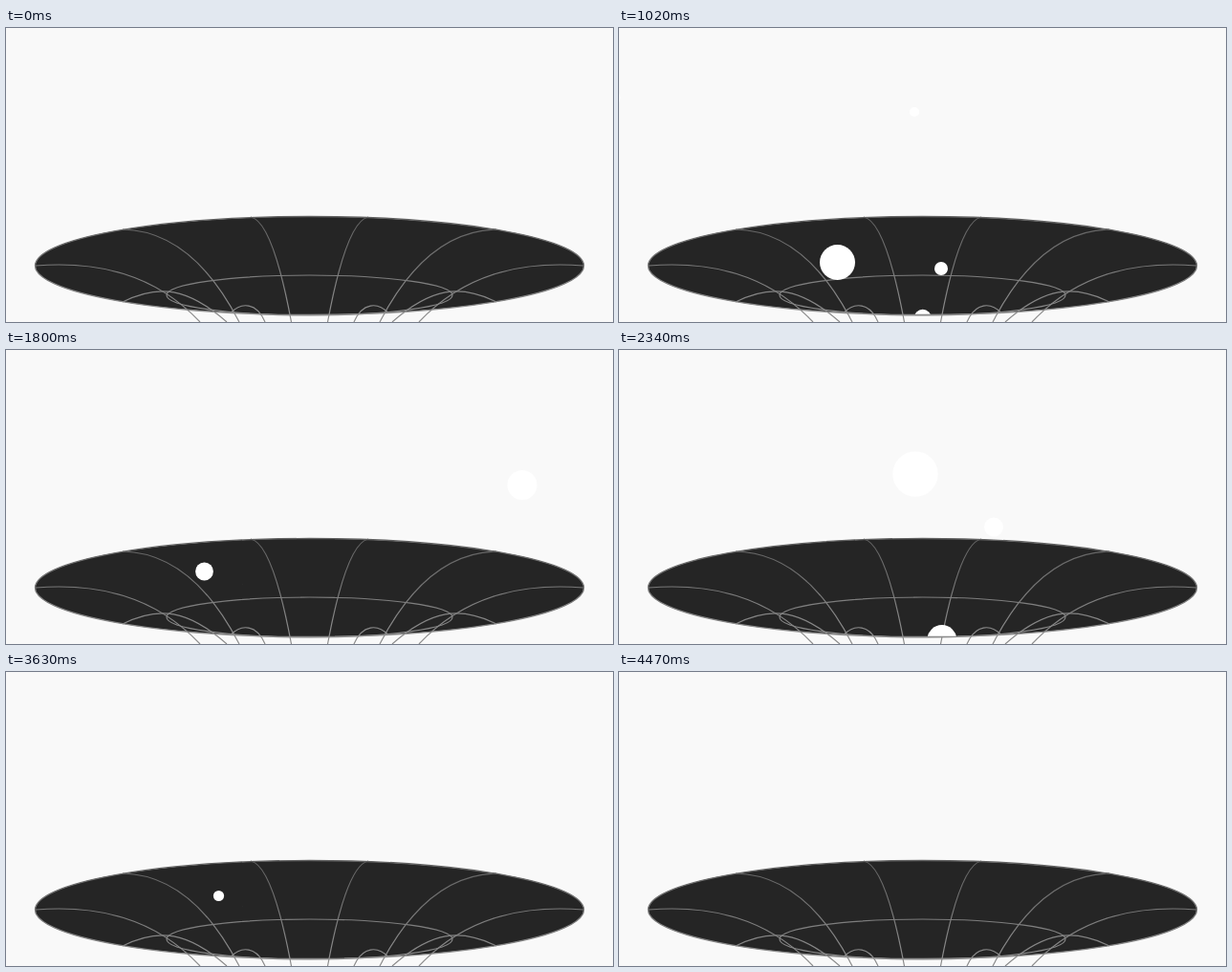
An HTML page for the animation above (4.53 s loop, 635 by 308 pixels).

```html
<!DOCTYPE html>
<html lang="en">
<head>
<meta charset="utf-8">
<title>Funnel</title>
<style>
html, body { margin: 0; width: 100%; height: 100%; overflow: hidden; background: #f9f9f9; }
svg { display: block; width: 100%; height: 100%; }
</style>
</head>
<body>
<svg viewBox="0 0 635 308">
  <defs>
    <clipPath id="mouth">
      <path d="M-50 -50H685V249H604.5A287 51.5 0 0 1 30.5 249H-50Z"/>
    </clipPath>
    <linearGradient id="wire" gradientUnits="userSpaceOnUse" x1="0" y1="198" x2="0" y2="300">
      <stop offset="0" stop-color="#606060"/>
      <stop offset="0.6" stop-color="#7c7c7c"/>
      <stop offset="1" stop-color="#8c8c8c"/>
    </linearGradient>
    <g id="half">
      <path d="M31 249C95 244 155 257 203 308"/>
      <path d="M122 211C172 212 212 246 244 308"/>
      <path d="M256 198C271 201 285 236 298.5 308"/>
      <path d="M122 287C160 268 190 272 231 308"/>
      <path d="M235 298.5C246 287 262 287 271 308"/>
    </g>
  </defs>
  <rect width="635" height="308" fill="#f9f9f9"/>
  <ellipse cx="317.5" cy="249" rx="287" ry="51.5" fill="#252525"/>
  <g fill="none" stroke="url(#wire)" stroke-width="1.2">
    <use href="#half"/>
    <use href="#half" transform="matrix(-1 0 0 1 635 0)"/>
    <ellipse cx="317.5" cy="280" rx="149.5" ry="21"/>
  </g>
  <g id="balls" fill="#fff" clip-path="url(#mouth)"></g>
  <ellipse cx="317.5" cy="249" rx="287" ry="51.5" fill="none" stroke="url(#wire)" stroke-width="1.3"/>
</svg>
<script>
const LOOP = 4530, STEP = 30;
const HOLE = { x: 318, y: 304 };

// Each ball passes (x, y) at time t and sinks into the hole at time end.
const balls = [
  { r: 6, x: 313, y: 190.5, t: 540, end: 860 },
  { r: 9, x: 314, y: 188, t: 730, end: 1043 },
  { r: 18.5, x: 228.5, y: 245.5, t: 1020, end: 1264 },
  { r: 7, x: 337, y: 252, t: 1020, end: 1179 },
  { r: 5, x: 309, y: 88, t: 1020, end: 1587 },
  { r: 9.4, x: 207.5, y: 232, t: 1800, end: 2200 },
  { r: 15.5, x: 540, y: 141.5, t: 1800, end: 2393 },
  { r: 10, x: 392, y: 185.5, t: 2340, end: 2680 },
  { r: 23.7, x: 310, y: 130, t: 2340, end: 2845 },
  { r: 2.8, x: 356, y: 58.5, t: 2730, end: 3442 },
  { r: 5.6, x: 222.5, y: 234.5, t: 3630, end: 3897 },
  { r: 12, x: 300, y: 187, t: 4132, end: 4454 }
];

const layer = document.getElementById("balls");
for (const b of balls) {
  b.el = document.createElementNS("http://www.w3.org/2000/svg", "circle");
  b.el.setAttribute("r", b.r);
  layer.appendChild(b.el);
}

function draw(now) {
  for (const b of balls) {
    const k = (b.end - now) / (b.end - b.t);
    const bottom = HOLE.y + b.r;
    b.el.setAttribute("cx", HOLE.x + (b.x - HOLE.x) * k);
    b.el.setAttribute("cy", bottom + (b.y - bottom) * k);
    b.el.setAttribute("visibility", k > 0 ? "visible" : "hidden");
  }
}

const start = performance.now();
function tick() {
  const t = (performance.now() - start) % LOOP;
  draw(Math.floor(t / STEP) * STEP);
  requestAnimationFrame(tick);
}
tick();
</script>
</body>
</html>
```
